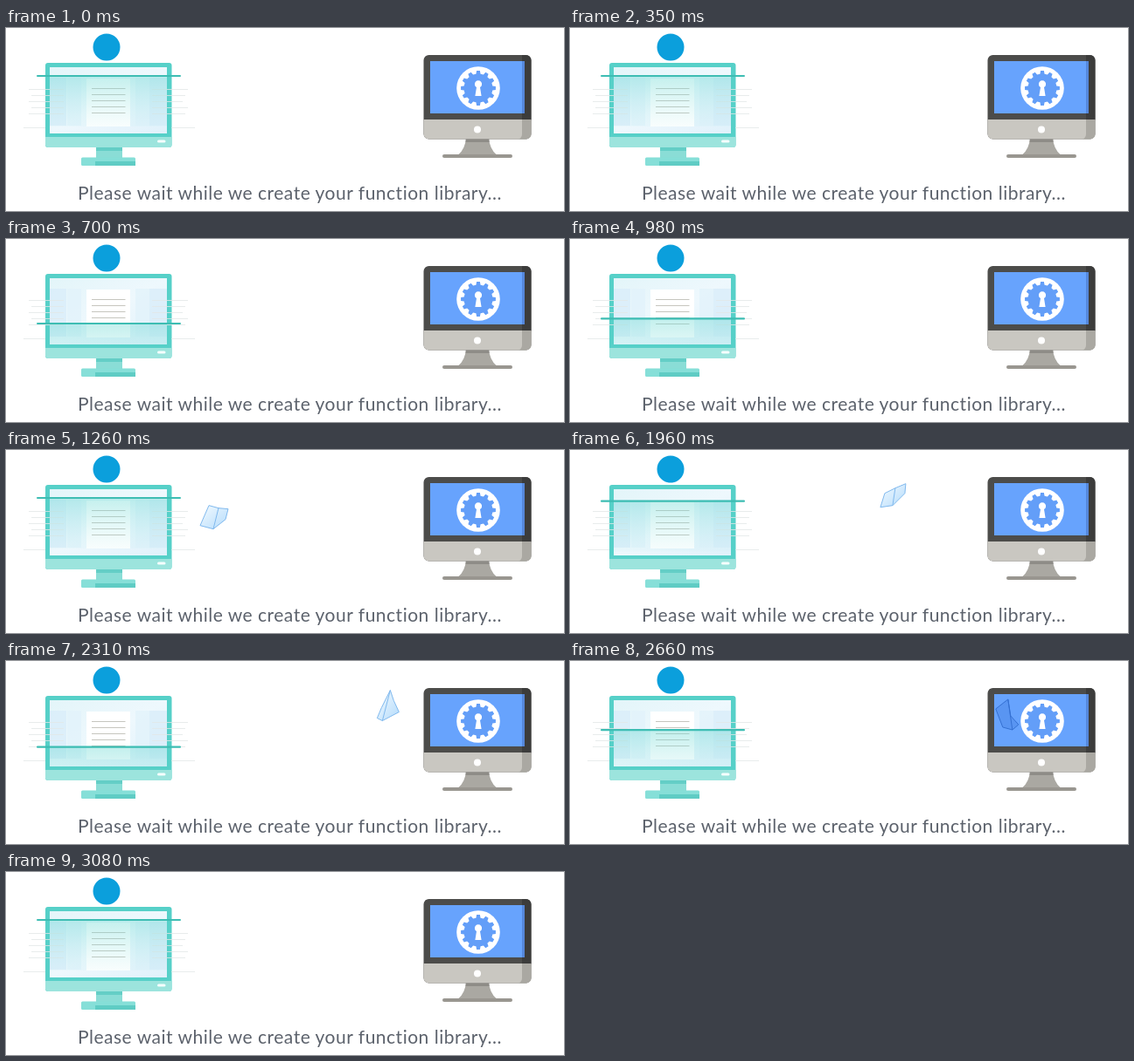
Recreate the animation shown at these times as an HTML page. Size 638 px wide and 210 px high, loop 3150 ms.

```html
<!DOCTYPE html>
<html lang="en">
<head>
<meta charset="utf-8">
<title>Creating library</title>
<style>
html, body { margin: 0; width: 100%; height: 100%; overflow: hidden; background: #fff; }
svg { display: block; width: 638px; height: 210px; }
text { font: 21px Lato, "Open Sans", sans-serif; letter-spacing: .5px; fill: #5c626c; }
</style>
</head>
<body>
<svg viewBox="0 0 638 210">
  <defs>
    <linearGradient id="glass" x2="1" y2="1">
      <stop stop-color="#e3f5f9"/><stop offset=".5" stop-color="#eef8fd"/><stop offset="1" stop-color="#e0f1fb"/>
    </linearGradient>
    <linearGradient id="glow" x2="0" y2="1">
      <stop stop-color="#6fdad4" stop-opacity=".42"/><stop offset="1" stop-color="#a5e8e8" stop-opacity=".08"/>
    </linearGradient>
    <linearGradient id="sheet" x2="1" y2="1">
      <stop stop-color="#f4fbff"/><stop offset="1" stop-color="#b4dbfb"/>
    </linearGradient>
    <clipPath id="pane"><path d="M50 45h134v76h-134z"/></clipPath>
  </defs>

  <circle cx="115" cy="22" r="15.5" fill="#0b9fdc"/>

  <!-- left monitor -->
  <path d="M103 136h30v13h-30z" fill="#8addd6"/>
  <path d="M103 136h30v5h-30z" fill="#64cec6"/>
  <rect x="86" y="148.500" width="62" height="9.500" rx="1.500" fill="#86dfd8"/>
  <path d="M102 153h46v5h-46z" fill="#5fccc4"/>
  <rect x="45" y="40" width="144.500" height="97" rx="3" fill="#56d0c8"/>
  <path d="M45 125h144.500v9a3 3 0 0 1-3 3h-138.500a3 3 0 0 1-3-3z" fill="#9ce4dd"/>
  <rect x="173" y="128.500" width="9.500" height="3" rx="1.500" fill="#f5fffe"/>
  <path d="M50 45h134v76h-134z" fill="url(#glass)"/>
  <path d="M50 57h19v55h-19zM164 57h20v55h-20z" fill="#d8edfa" opacity=".75"/>
  <path d="M70 57h16v55h-16zM148 57h16v55h-16z" fill="#e2f2fb" opacity=".7"/>
  <path d="M92 58h50v55h-50z" fill="#fff"/>
  <path id="lines" stroke="#c6c5be"/>
  <path id="streaks" stroke="#e3e7e8" stroke-width=".8"/>
  <g clip-path="url(#pane)"><rect id="trail" x="50" width="134" height="58" fill="url(#glow)"/></g>
  <rect id="bar" x="35" width="165" height="2.200" rx="1" fill="#3dbdb3"/>

  <!-- right monitor -->
  <path d="M526 126h26q1 13 9 19.500h-44q8-6.500 9-19.500z" fill="#aaa8a2"/>
  <path d="M526 126h26l.6 5h-27z" fill="#8e8c87"/>
  <rect x="499" y="145" width="80" height="4" rx="2" fill="#999690"/>
  <rect x="477.500" y="31" width="123" height="96.500" rx="6" fill="#4c4c4a"/>
  <path d="M590 31h4.500a6 6 0 0 1 6 6v69h-10.500z" fill="#3c3c3b"/>
  <path d="M477.500 105h123v16.500a6 6 0 0 1-6 6h-111a6 6 0 0 1-6-6z" fill="#c9c7c1"/>
  <path d="M590 105h10.500v16.500a6 6 0 0 1-6 6h-8q3.500-2 3.500-6z" fill="#aaa8a2"/>
  <circle cx="539" cy="116.500" r="4" fill="#fff"/>
  <path d="M485 38h108v60h-108z" fill="#67a3fd"/>
  <path d="M590 38h3v60h-3z" fill="#5587db"/>

  <g id="paper" stroke-linejoin="round"><path id="leaf"/><path id="crease" fill="none"/></g>

  <circle cx="540" cy="69" r="24.800" fill="#fff"/>
  <path id="gear" fill="#639ef8"/>
  <path d="M538 68a4.100 4.100 0 1 1 4 0l1.600 10h-7.200z" fill="#fff"/>

  <text x="82" y="197">Please wait while we create your function library...</text>
</svg>
<script>
const LOOP = 3150, STEP = 70, SCAN = LOOP / 2;
const $ = id => document.getElementById(id);
const set = (id, attrs) => { for (const k in attrs) $(id).setAttribute(k, attrs[k]); };
const clamp = (v, a, b) => Math.min(b, Math.max(a, v));

const rows = [69.5, 76.5, 83.5, 90.5, 97.5];
set('lines', { d: rows.map(y => `M98 ${y}H136.500`).join('') });
set('streaks', {
  d: rows.map((y, i) => `M${26 + i % 2 * 3} ${y + 1}H66M167 ${y + 1}H${208 - i % 3 * 3}`).join('') +
    'M20 114.500H45M189 114.500H216'
});

function gearPath() {
  const pts = [];
  for (let i = 0; i < 12; i++) {
    for (const [r, off] of [[16.5, -.3], [20, -.18], [20, .18], [16.5, .3]]) {
      const a = (i + off) * Math.PI / 6;
      pts.push((540 + r * Math.cos(a)).toFixed(2) + ' ' + (69 + r * Math.sin(a)).toFixed(2));
    }
  }
  return 'M' + pts.join('L') + 'Z';
}
set('gear', { d: gearPath() });

// Tumbling sheet: time, then six outline points around its centre
const poses = [
  [1260, -16, 10, -6, -13, 5, -10, 16, -9, 13, 3, -1, 14],
  [1960, -14, 13, -9, -3, 3, -9, 15, -14, 14, -3, 0, 11],
  [2310, -10, 12, -5, 0, 5, -20, 9, -8, 15, 5, -4, 15],
  [2660, -5, 13, -13, -8, 1, -19, 4, 0, 13, 10, 6, 16]
];

function poseAt(t) {
  t = clamp(t, poses[0][0], poses[3][0]);
  const i = t < poses[1][0] ? 0 : t < poses[2][0] ? 1 : 2;
  const a = poses[i], b = poses[i + 1], f = (t - a[0]) / (b[0] - a[0]);
  return a.slice(1).map((v, k) => v + (b[k + 1] - v) * f);
}

function drawPaper(t) {
  const x = 238 + .187 * (t - 1260), y = 52 + .001 * (x - 395) ** 2;
  const p = poseAt(t), at = i => `${p[2 * i]} ${p[2 * i + 1]}`;
  const inside = x > 485;
  set('paper', {
    visibility: t >= 1050 && t < 2870 ? 'visible' : 'hidden',
    transform: `translate(${x} ${y})`,
    stroke: inside ? '#3470d2' : '#80b9ee',
    fill: inside ? '#5995f2' : 'url(#sheet)'
  });
  set('leaf', { d: `M${[0, 1, 2, 3, 4, 5].map(at).join('L')}Z` });
  set('crease', { d: `M${at(2)}L${at(5)}` });
}

function draw(now) {
  const t = Math.floor(now % LOOP / STEP) * STEP;
  // The bar rests at the top, then sweeps down and back
  const phase = clamp((t % SCAN / SCAN - .23) / .56, 0, 1);
  const y = 55 + 45 * Math.sin(Math.PI * phase);
  set('bar', { y: y - 1.1 });
  set('trail', { y });
  drawPaper(t);
}

const start = performance.now();
function tick() {
  draw(performance.now() - start);
  requestAnimationFrame(tick);
}
tick();
</script>
</body>
</html>
```
